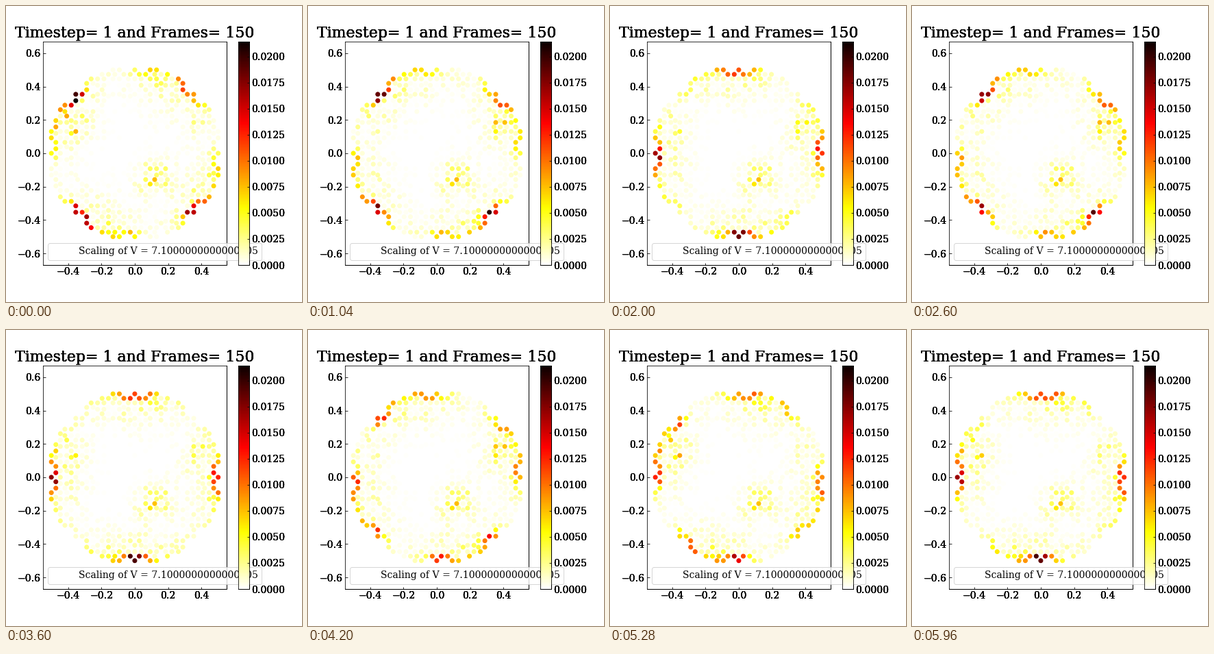
A matplotlib script for the animation above (6000 ms loop, 432x432 px).

```python
import numpy as np
import matplotlib.pyplot as plt
from matplotlib.animation import FuncAnimation
from matplotlib.lines import Line2D

FRAMES = 150
VMAX = 0.02145
LOBE_PERIOD = 19.28          # steps for the four-lobed pattern to turn 90 degrees
ROOT2 = np.sqrt(2)
APOTHEM = 6 + 5 * ROOT2      # size of the octagonal sample, in tile edges

plt.rcParams.update({
    "font.family": "DejaVu Serif",
    "font.size": 14,
    "xtick.direction": "in",
    "ytick.direction": "in",
})


def octagon_norm(x, y):
    """Apothem of the centred octagon that passes through each point."""
    x, y = np.abs(x), np.abs(y)
    return np.maximum(np.maximum(x, y), (x + y) / ROOT2)


def tiling():
    """Ammann-Beenker vertices with unit edges, cut to a rounded octagon."""
    k = np.arange(-8, 9)
    a, b, c, d = (g.ravel() for g in np.meshgrid(k, k, k, k))
    dx, dy = (b - d) / ROOT2, (b + d) / ROOT2
    x, y = a + dx, c + dy
    keep = octagon_norm(a - dx, c - dy) < (1 + ROOT2) / 2
    keep &= (octagon_norm(x, y) < APOTHEM + 0.01) & (np.hypot(x, y) < 13.52)
    return x[keep], y[keep]


def bump(x, y, x0, y0, width):
    return np.exp(-((x - x0) ** 2 + (y - y0) ** 2) / (2 * width ** 2))


def arc_bump(deg, centre, width):
    gap = (deg - centre + 180) % 360 - 180
    return np.exp(-gap ** 2 / (2 * width ** 2))


x, y = tiling()
r, deg = np.hypot(x, y), np.degrees(np.arctan2(y, x))
rng = np.random.default_rng(4)
grain = np.minimum(rng.gamma(1.6, 0.6, x.size), 2.4)

# Rim: eightfold modulation plus a few hot spots
rim = (octagon_norm(x, y) > 12.3) & ~((r > 12.6) & (r < 13.06))
rim_peak = 9.5 + 3 * np.cos(np.radians(8 * deg))
for centre, gain in [(136, 17), (182, 4), (222, 8), (235, 9), (270, 10), (313, 11)]:
    rim_peak += gain * arc_bump(deg, centre, 3.5)
rim_peak *= rng.uniform(0.85, 1.15, x.size)

# Bulk: fades inwards, with a bright pocket behind each upper flank
bulk = 3.4 * np.exp(-(13.1 - r) / 2.4)
for angle in np.radians([22.5, 157.5]):
    bulk += 3.2 * bump(x, y, 10.6 * np.cos(angle), 10.6 * np.sin(angle), 1.4)

peak = 1e-3 * np.where(rim, rim_peak, bulk * grain)
contrast = np.where(rim, 0.9, 0.6)
pocket = 3.4e-3 * grain * bump(x, y, 3.4, -3.8, 1.8)


def density(i):
    lobe = 60 - 90 * i / LOBE_PERIOD
    wave = np.cos(np.radians(4 * (deg - lobe)))
    return peak * (1 + contrast * wave) / (1 + contrast) + pocket


fig = plt.figure(figsize=(6, 6), dpi=72, facecolor="white")


def add_panels():
    ax = fig.add_axes([0.125, 0.125, 0.62, 0.755])
    half = 0.55
    tall = half * 0.755 / 0.62
    ax.set(xlim=(-half, half), ylim=(-tall, tall),
           xticks=np.arange(-2, 3) * 0.2, yticks=np.arange(-3, 4) * 0.2)
    ax.set_title("Timestep= 1 and Frames= 150", fontsize=22)

    cax = fig.add_axes([0.78375, 0.125, 0.03775, 0.755])
    cax.yaxis.tick_right()
    cax.set(xticks=[], ylim=(0, VMAX), yticks=np.arange(9) * 0.0025)
    cax.yaxis.set_major_formatter("{x:.4f}")
    return ax, cax


# Stacked copies harden the antialiased edges of labels and outer frame lines
for _ in range(3):
    add_panels()
ax, cax = add_panels()

scale = 0.5 / APOTHEM
dots = ax.scatter(x * scale, y * scale, c=density(0), s=36,
                  cmap="hot_r", vmin=0, vmax=VMAX)
ax.legend([Line2D([], [], alpha=0)], ["Scaling of V = 7.1000000000000005"],
          loc="lower left", fontsize=14)
fig.colorbar(dots, cax=cax, ticks=np.arange(9) * 0.0025, format="%.4f")


def update(i):
    dots.set_array(density(i))
    return (dots,)


anim = FuncAnimation(fig, update, frames=FRAMES, interval=40,
                     repeat=True, repeat_delay=0, blit=False)
plt.show()
```
